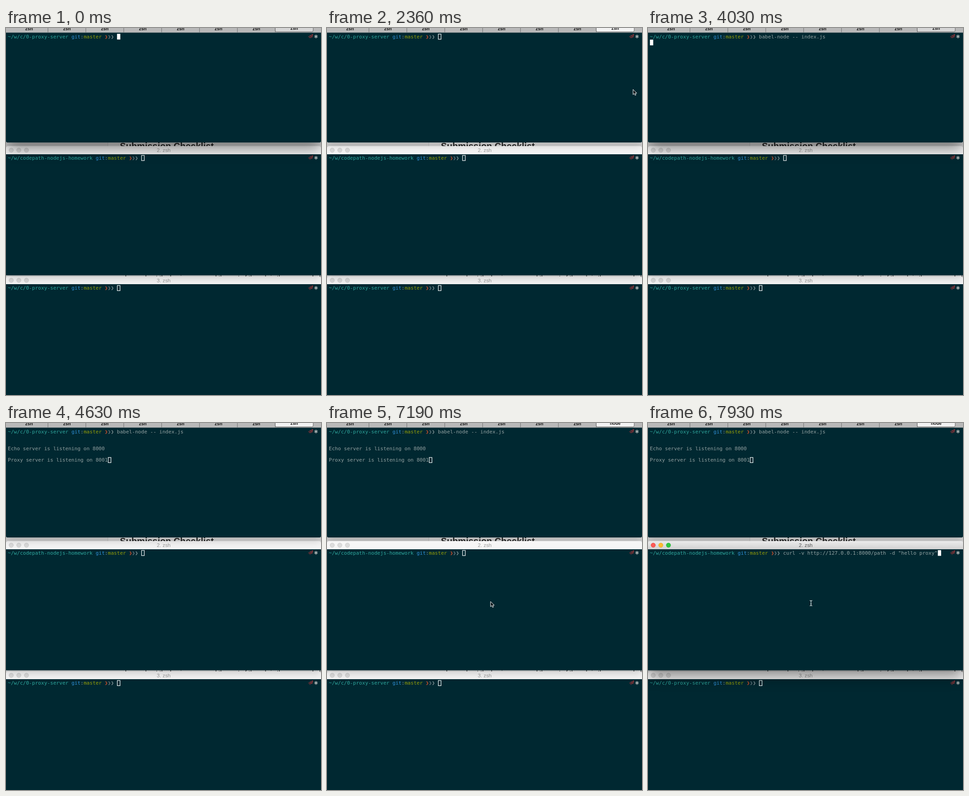
Animation, 693 px wide and 808 px high, one loop 8000 ms. Source, as an HTML page:

```html
<!DOCTYPE html>
<html lang="en">
<head>
<meta charset="utf-8">
<title>Three terminals</title>
<style>
  html, body { margin: 0; width: 100%; height: 100%; overflow: hidden; background: #002831; }
  svg { display: block; width: 100%; height: 100%; }
  text { white-space: pre; }
  .mono { font: 11.07px "DejaVu Sans Mono", monospace; }
  .ui { font-family: "Liberation Sans", Arial, sans-serif; text-anchor: middle; }
  .page { font-family: "Liberation Sans", Arial, sans-serif; fill: #222; }
</style>
</head>
<body>
<svg id="stage" viewBox="0 0 693 808">
  <defs>
    <filter id="soft" filterUnits="userSpaceOnUse" x="-80" y="-80" width="860" height="960"><feGaussianBlur stdDeviation="9"/></filter>
    <filter id="deep" filterUnits="userSpaceOnUse" x="-80" y="-80" width="860" height="960"><feGaussianBlur stdDeviation="16"/></filter>
    <linearGradient id="lit" x2="0" y2="1"><stop stop-color="#ebebeb"/><stop offset="1" stop-color="#d2d2d2"/></linearGradient>
    <clipPath id="under1"><rect id="under1Box" y="252" width="693" height="300"/></clipPath>
    <clipPath id="under2"><rect y="544" width="693" height="264"/></clipPath>
  </defs>
</svg>
<script>
const LOOP = 8000, CELL = 6.6667, LEFT = 4;
const GREY = '#93a1a1', TERM = '#002831';
const stage = document.getElementById('stage');

function set(el, attrs) {
  for (const k in attrs) el.setAttribute(k, attrs[k]);
  return el;
}
function add(tag, attrs, parent = stage, text = '') {
  const el = set(document.createElementNS('http://www.w3.org/2000/svg', tag), attrs);
  el.textContent = text;
  return parent.appendChild(el);
}
const show = (el, on) => el.setAttribute('visibility', on ? 'visible' : 'hidden');
const mono = (col, y, fill, text) =>
  add('text', { class: 'mono', x: LEFT + col * CELL, y, fill }, stage, text);

function prompt(path, y) {
  let col = path.length + 1;
  mono(0, y, '#2fa69d', path);
  mono(col, y, '#2f8fd6', 'git');
  mono(col + 3, y, GREY, ':');
  mono(col + 4, y, '#959e08', 'master');
  ['#d4502a', '#667b83', '#839496'].forEach((c, i) => mono(col + 11 + i, y, c, '❯'));
  add('path', {
    d: `M673 ${y - 8.5}h1.8l-1.3 6h-4l-.4 2-3.2-3 4.4-3-.4 2h2.2z`,
    fill: 'none', stroke: '#d4383a', 'stroke-width': 0.9
  });
  add('path', {
    d: `M682 ${y - 7.8}v8M678.6 ${y - 5.8}l6.8 4M685.4 ${y - 5.8}l-6.8 4`,
    stroke: '#a3adad', 'stroke-width': 1.7
  });
}

function titleBar(top, height, label) {
  const bar = add('path', {
    d: `M0 ${top + height}V${top + 5}Q0 ${top} 5 ${top}H688Q693 ${top} 693 ${top + 5}V${top + height}Z`
  });
  const cy = top + height / 2;
  const dots = [11.5, 28.2, 45].map(cx => add('circle', { cx, cy, r: 4.8 }));
  const text = add('text', { class: 'ui', x: 347, y: cy + 4, 'font-size': 11.4 }, stage, label);
  return active => {
    set(bar, { fill: active ? 'url(#lit)' : '#f6f6f6' });
    set(text, { fill: active ? '#555' : '#999' });
    dots.forEach((d, i) => set(d, {
      fill: active ? ['#fc5b57', '#fdbc2f', '#2fc840'][i] : '#dcdcdc',
      stroke: active ? ['#e2463f', '#e1a12a', '#1fae30'][i] : '#c8c8c8',
      'stroke-width': 0.8
    }));
  };
}

function shadow(bottom, clip) {
  const group = add('g', { 'clip-path': `url(#${clip})` });
  const rect = add('rect', { width: 693 }, group);
  return active => set(rect, {
    y: bottom - 240, height: 240 + (active ? 14 : 10),
    filter: active ? 'url(#deep)' : 'url(#soft)',
    opacity: active ? 0.45 : 0.14
  });
}

function caret() {
  const el = add('rect', { stroke: '#fff', 'stroke-width': 1.2 });
  return (col, top, active) => set(el, {
    x: LEFT + col * CELL + 0.9, y: top + 0.6, width: 6, height: 11.4,
    fill: active ? '#fff' : 'none'
  });
}

const terminal = (y, h) => add('rect', { y, width: 693, height: h, rx: 3, fill: TERM });

// Page behind the windows
add('rect', { width: 693, height: 808, fill: '#d4d4d4' });
add('rect', { y: 250, width: 224, height: 14, fill: '#cecece' });
add('path', { d: 'M224 250v14', stroke: '#b8b8b8' });
add('text', { class: 'page', x: 250.5, y: 266.5, 'font-size': 19.9, 'font-weight': 700 }, stage, 'Submission Checklist');
add('text', { class: 'page', x: 262, y: 555, 'font-size': 14 }, stage, 'know about the basic server and the rest of the rubric then as needed with');

// Bottom window
const title3 = titleBar(547, 17, '3. zsh');
add('rect', { y: 564, width: 693, height: 244, fill: TERM });
prompt('~/w/c/0-proxy-server', 576);
const caret3 = caret();
const shade2 = shadow(544, 'under2');

// Middle window
const title2 = titleBar(260, 18, '2. zsh');
terminal(274, 270.5);
const patch = add('rect', { y: 270, width: 693, height: 8 });
patch.remove();
stage.insertBefore(stage.lastChild, stage.lastChild);
const middle = stage.lastChild;
set(middle, { y: 278, height: 266.5, rx: 0 });
prompt('~/w/codepath-nodejs-homework', 289.5);
const curl = mono(44, 289.5, GREY, 'curl -v http://127.0.0.1:8000/path -d "hello proxy"');
const caret2 = caret();
const shade1 = shadow(252, 'under1');

// Top window
terminal(5, 247);
add('rect', { width: 693, height: 10, fill: '#b9b9b9' });
add('path', { d: 'M0 10h693', stroke: '#8b9496', 'stroke-width': 0.8 });
const tabs = Array.from({ length: 8 }, (_, i) => {
  const x = 9 + i * 83.35, last = i === 7;
  const box = last
    ? add('rect', { x: 592.3, y: -8, width: 83.6, height: 16.4, rx: 3, stroke: '#555', 'stroke-width': 0.9 })
    : add('path', { d: `M${x + 83.3} 0v9.6`, stroke: '#666', 'stroke-width': 0.9 });
  const label = add('text', {
    class: 'ui', x: x + 41.7, y: last ? 4 : 5, 'font-size': 10, 'font-weight': 700, fill: '#111'
  }, stage, 'zsh');
  return { box, label };
});
const tab = tabs[7];
prompt('~/w/c/0-proxy-server', 22.6);
const babel = mono(36, 22.6, GREY, 'babel-node -- index.js');
const output = [
  mono(0, 60.2, GREY, 'Echo server is listening on 8000'),
  mono(0, 85.2, GREY, 'Proxy server is listening on 8001')
];
const caret1 = caret();

// Pointers
const arrow = add('path', {
  d: 'M0 0V11.4L2.7 8.9 4.5 13 6.5 12.1 4.8 8.2H8.2Z',
  fill: '#0a1418', stroke: '#fff', 'stroke-width': 1
});
const beam = add('path', {
  d: 'M-2.8-5.8Q-.2-5.8 0-4.4 .2-5.8 2.8-5.8M0-4.6V4.6M-2.8 5.8Q-.2 5.8 0 4.4 .2 5.8 2.8 5.8M-1.3 1.6H1.3',
  fill: 'none', stroke: '#e8eeee', 'stroke-width': 1.1
});

// Pointer steps: start time, shape, x, y
const steps = [
  [0, null],
  [2360, arrow, 673.3, 135.2],
  [2510, arrow, 671.5, 135.2],
  [2660, arrow, 520, 135.2],
  [2810, beam, 520, 138.7],
  [3110, arrow, 520, 135.6],
  [3290, beam, 520, 138.7],
  [4030, null],
  [6600, arrow, 685.8, 445],
  [6750, arrow, 359.8, 393],
  [7340, beam, 358.6, 396.7],
  [7640, arrow, 359, 393.6],
  [7790, beam, 358.6, 396.7]
];

function draw(t) {
  const top = t < 300 || (t >= 2960 && t < 4630);
  const raised = t >= 7190, mid = t >= 7340;
  const typed = t >= 3440, entered = t >= 3730, ready = t >= 4630, sent = t >= 7930;

  shade1(top);
  shade2(mid);
  set(document.getElementById('under1Box'), { height: raised ? 8 : 300 });
  title2(mid);
  title3(false);
  set(tab.box, { fill: top ? '#d6d6d6' : '#f3f3f3' });
  tab.label.textContent = t >= 5550 ? 'node' : 'zsh';

  show(babel, typed);
  output.forEach(line => show(line, ready));
  show(curl, sent);
  if (ready) caret1(33, 75.3, top);
  else if (entered) caret1(0, 25.6, top);
  else caret1(typed ? 58 : 36, 12.8, top);
  caret2(sent ? 95 : 44, 279.9, mid);
  caret3(36, 566.3, false);

  const [, shape, x, y] = steps.filter(s => s[0] <= t).pop();
  for (const p of [arrow, beam]) show(p, p === shape);
  if (shape) set(shape, { transform: `translate(${x} ${y})` });
}

const start = performance.now();
function tick(now) {
  draw(Math.max(0, now - start) % LOOP);
  requestAnimationFrame(tick);
}
draw(0);
requestAnimationFrame(tick);
</script>
</body>
</html>
```
